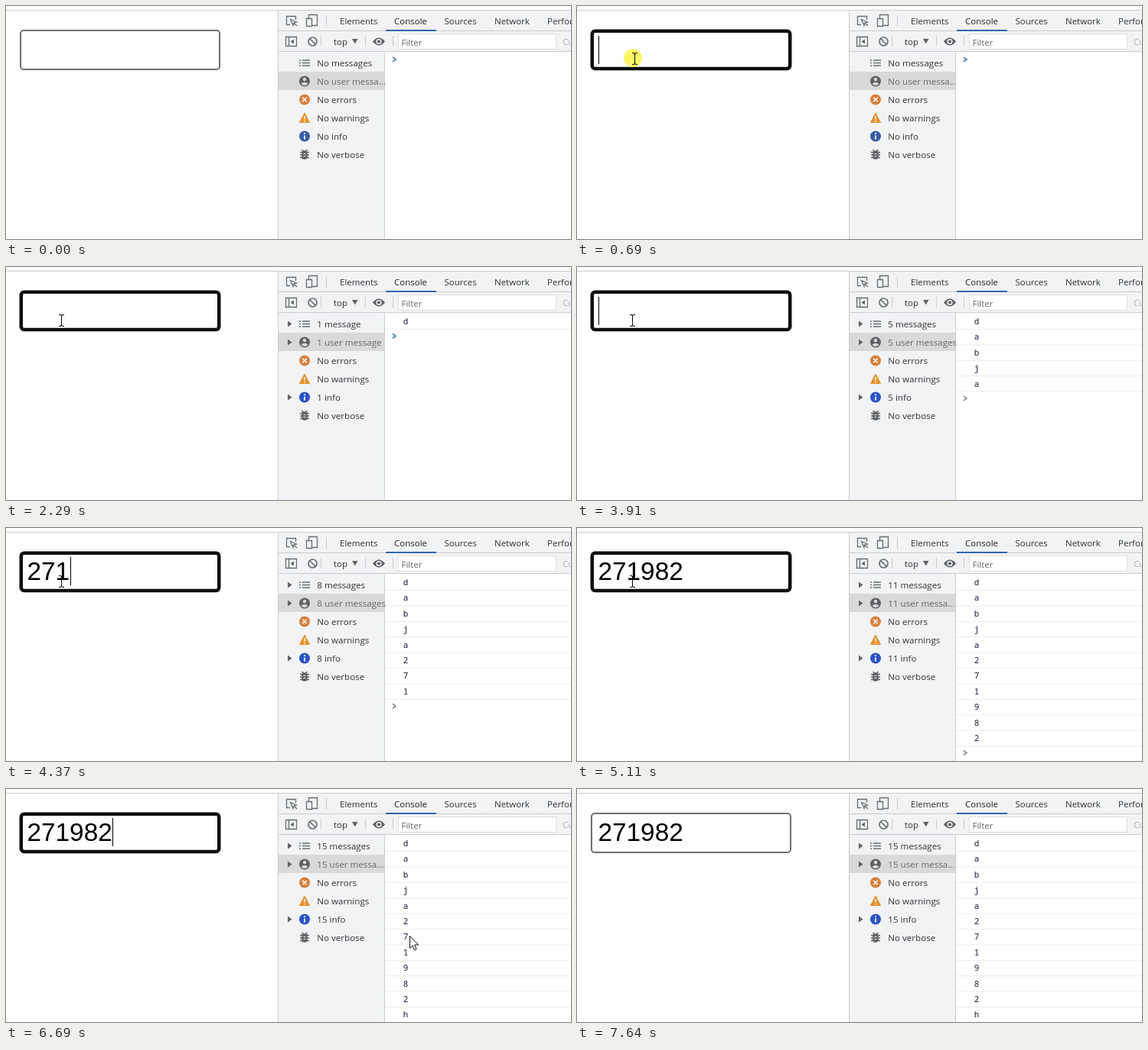
Write an HTML page that moves like this. It is 738 px wide and 305 px high and loops after 7770 ms.

```html
<!DOCTYPE html>
<html lang="en">
<head>
<meta charset="utf-8">
<title>Digits-only input with console</title>
<style>
  html, body { margin: 0; width: 100%; height: 100%; overflow: hidden; background: #fff; }
  svg { display: block; width: 738px; height: 305px; }
  .ui { font: 11.5px "Open Sans", "Noto Sans", sans-serif; fill: #303236; }
  .side { font-size: 11.6px; }
  .log { font: 11px "Noto Sans Mono", "DejaVu Sans Mono", monospace; fill: #1a2140; }
  .value { font: 33.33px "Liberation Sans", Arial, sans-serif; }
  .line { fill: none; stroke: #6a6d70; stroke-width: 1.3; }
  .rule { fill: none; stroke: #cbcdd0; }
</style>
</head>
<body>
<svg viewBox="0 0 738 305" xmlns="http://www.w3.org/2000/svg">
  <path class="rule" d="M0 5.5H738" stroke="#d8d8d8"/>

  <!-- page -->
  <rect id="box" fill="#fff"/>
  <text id="value" class="value" x="27.5" y="68"></text>
  <rect id="caret" width="1" height="37"/>

  <!-- panel -->
  <rect x="356" y="6" width="382" height="54" fill="#f1f3f4"/>
  <rect x="356" y="60" width="138" height="245" fill="#f1f3f4"/>
  <rect x="356" y="86" width="138" height="24" fill="#d9d9d9"/>
  <path class="rule" d="M355.5 6V305M356 32.5H738M356 59.5H738M494.5 60V305M418.5 12V27M411.5 39V53M469.5 39V53M505.5 39V53"/>
  <rect x="496" y="31" width="66" height="2" fill="#3465b0"/>
  <rect x="512.5" y="36.5" width="206" height="20" fill="#fff" stroke="#dedfe1"/>
  <g class="ui">
    <text x="436" y="24">Elements</text>
    <text x="507" y="24" fill="#222">Console</text>
    <text x="572.5" y="24">Sources</text>
    <text x="638" y="24">Network</text>
    <text x="707" y="24">Performance</text>
    <text x="428" y="51">top</text>
    <text x="516.5" y="52" fill="#666">Filter</text>
    <text x="727" y="51" style="fill:#b0b2b5">Custom levels</text>
  </g>
  <g class="line">
    <path d="M371 24.5H366.500V13.500H378.500V18M371.500 17.500L379.500 21 376 22 375 25.500ZM375.500 21.500L380 26"/>
    <path d="M395.500 16V11.500H406.500V25.500H400M392.500 16.500H399.500V26.500H392.500Z"/>
    <path d="M365.500 40.500H379.500V52.500H365.500ZM369.500 40V53"/>
    <circle cx="400.5" cy="46.500" r="5.500" stroke-width="1.700"/>
    <path d="M396.500 42.500L404.500 50.500" stroke-width="1.700"/>
  </g>
  <path d="M376 43.500V49.500L371.500 46.500ZM452 43H459.500L455.750 49.500Z" fill="#606266"/>
  <path d="M479 46.500Q487 36.500 495 46.500Q487 56.500 479 46.500Z" fill="#606266"/>
  <circle cx="487" cy="46.500" r="3.600" fill="#f1f3f4"/>
  <circle cx="487" cy="46.500" r="2.100" fill="#606266"/>

  <!-- sidebar icons -->
  <path d="M383 71H385M387 71H397M383 74.500H385M387 74.500H397M383 78H385M387 78H397" stroke="#6a6d70" stroke-width="1.500"/>
  <circle cx="390" cy="98.500" r="7" fill="#606266"/>
  <circle cx="390" cy="96" r="2.200" fill="#d9d9d9"/>
  <path d="M385.500 102Q390 97.500 394.500 102Q390 106 385.500 102Z" fill="#d9d9d9"/>
  <circle cx="390" cy="122.500" r="7" fill="#d6813f"/>
  <path d="M387.300 119.800L392.700 125.200M392.700 119.800L387.300 125.200" stroke="#fff" stroke-width="1.500"/>
  <path d="M390 140L396.500 152.500H383.500Z" fill="#e8912e" stroke="#e8912e" stroke-linejoin="round"/>
  <path d="M390 144V148.500M390 150V151.500" stroke="#fff" stroke-width="1.600"/>
  <circle id="info" cx="390" cy="170.500" r="7"/>
  <path d="M390 166V168M390 169.500V174.500" stroke="#fff" stroke-width="2"/>
  <g stroke="#606266" stroke-width="1.500">
    <path d="M384 191.500H396M384 195H396M384 198.500H396M386.500 188L388.500 190M393.500 188L391.500 190"/>
    <rect x="387" y="190" width="6" height="10" rx="2.800" fill="#606266"/>
  </g>
  <path d="M388.500 193.500H391.500M388.500 196.500H391.500" stroke="#f1f3f4"/>
  <path id="expand" d="M368 70.500L373.500 74.500 368 78.500ZM368 94.500L373.500 98.500 368 102.500ZM368 166.500L373.500 170.500 368 174.500Z" fill="#606266"/>
  <g id="labels" class="ui side"></g>

  <g id="rows" class="log"></g>
  <path id="prompt" d="M505 67L509 70 505 73" fill="none" stroke-width="1.500"/>

  <!-- pointer -->
  <circle id="click" cx="73" cy="68" r="12" fill="#fcf767"/>
  <path id="beam" d="M-3-7.500H-1L.500-6.500 2-7.500H4M.500-6.500V6.500M-3 7.500H-1L.500 6.500 2 7.500H4" fill="none" stroke="#111" stroke-width="1.100"/>
  <path id="arrow" d="M.500.500V16.500L4.200 13 6.700 18.700 9.200 17.600 6.700 12H11.700Z" fill="#fff" stroke="#111"/>
</svg>
<script>
const LOOP = 7770, ROW = 20.4, TICK = 69.5;
const typed = [...'dabja271982hkls'];
const typedAt = [1960, 2490, 2620, 2890, 2960, 4170, 4240, 4310, 4440, 4510, 4580, 5240, 5310, 5380, 5380];
const caretOn = [[690, 1230], [1760, 2290], [2820, 3360], [3910, 5110], [5650, 6200], [6690, 7240]];

const arrive = [[651, 290], [600, 255], [520, 215], [410, 180], [290, 152], [190, 128], [120, 106], [90, 82], [75, 69]];
const leave = [[64, 77], [44, 94], [25, 112], [13, 128], [12, 142], [62, 164], [190, 182], [370, 190],
               [527, 192], [585, 212], [622, 236], [646, 255], [660, 273], [670, 289]];

const $ = id => document.getElementById(id);
const show = (el, on) => el.setAttribute('display', on ? 'inline' : 'none');
const set = (el, attrs) => { for (const k in attrs) el.setAttribute(k, attrs[k]); };
const add = (parent, tag, attrs) => {
  const el = document.createElementNS('http://www.w3.org/2000/svg', tag);
  set(el, attrs);
  return parent.appendChild(el);
};

const labels = [0, 1, 2, 3, 4, 5].map(i => add($('labels'), 'text', { x: 406.3, y: 79 + 24 * i }));
labels[1].style.fill = '#66686b';

const rows = typed.map((char, i) => {
  const row = add($('rows'), 'g', { transform: `translate(0 ${i * ROW})` });
  add(row, 'text', { x: 518.7, y: 75 }).textContent = char;
  add(row, 'path', { d: 'M495 81.500H738', stroke: '#ededed' });
  return row;
});

function pointerAt(t) {
  if (t < 70 || t >= 7110) return null;
  if (t >= 6130) return leave[Math.min(leave.length - 1, Math.floor((t - 6130) / TICK))];
  if (t >= 900) return [72, 70];
  return arrive[Math.min(arrive.length - 1, Math.floor((t - 70) / 68.5))];
}

function drawInput(t, text) {
  const focused = t >= 690 && t < 7640;
  set($('box'), focused
    ? { x: 19.75, y: 32.75, width: 258.5, height: 49.25, rx: 4, stroke: '#0e0e0e', 'stroke-width': 4.5 }
    : { x: 19, y: 32, width: 260, height: 51, rx: 4, stroke: '#707070', 'stroke-width': 2 });
  $('value').textContent = text;
  set($('caret'), text ? { x: 28 + Math.round(text.length * 18.53), y: 38 } : { x: 28, y: 39 });
  show($('caret'), caretOn.some(([from, to]) => t >= from && t < to));
}

function drawPanel(t, count) {
  const listed = t < 2030 ? 0 : count;
  const total = listed || 'No';
  const plural = listed === 1 ? '' : 's';
  const user = listed > 0 && listed < 10 ? `user message${plural}` : 'user messa...';
  [`${total} message${plural}`, `${total} ${user}`, 'No errors', 'No warnings', `${total} info`, 'No verbose']
    .forEach((text, i) => { labels[i].textContent = text; });
  show($('expand'), listed);
  set($('info'), { fill: listed ? '#2b52c6' : '#3a5ca6' });
  rows.forEach((row, i) => show(row, i < count));
  set($('prompt'), {
    transform: `translate(0 ${count * ROW})`,
    stroke: count === 0 ? '#3a66a8' : count < 5 ? '#2a6ad4' : '#7c7f83'
  });
}

function drawPointer(t) {
  const at = pointerAt(t);
  const inside = at && at[0] > 18 && at[0] < 280 && at[1] > 31 && at[1] < 84;
  show($('beam'), inside);
  show($('arrow'), at && !inside);
  show($('click'), t >= 690 && t < 830);
  if (at) set($(inside ? 'beam' : 'arrow'), { transform: `translate(${at})` });
}

function draw(t) {
  const count = typedAt.filter(time => time <= t).length;
  drawInput(t, typed.slice(0, count).filter(char => char >= '0' && char <= '9').join(''));
  drawPanel(t, count);
  drawPointer(t);
}

const start = performance.now();
function tick() {
  draw((performance.now() - start) % LOOP);
  requestAnimationFrame(tick);
}
tick();
</script>
</body>
</html>
```
